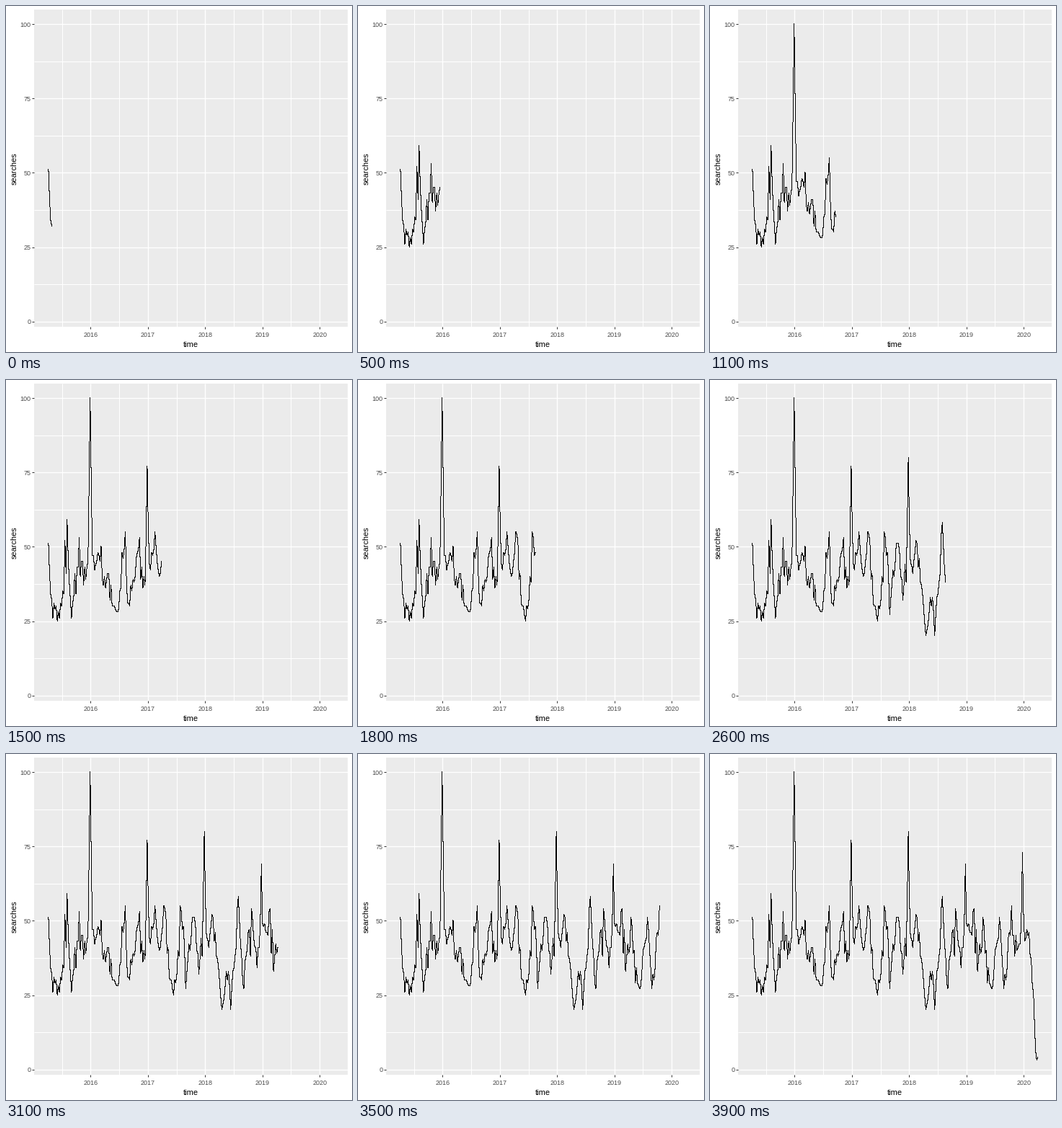
A matplotlib script that plays this animation: 480x480 px, repeating every 10 s.

```python
import numpy as np
import matplotlib.pyplot as plt
from matplotlib.animation import FuncAnimation
from matplotlib.patches import Rectangle

SIZE, DPI = 480, 100
PT = 72 / DPI                      # points per pixel
FRAMES, INTERVAL, REVEAL = 100, 100, 39
LEFT, RIGHT, TOP, BOTTOM = 39, 474, 5, 445
YEAR = 79.45                       # pixels per year
WEEKS = 260
STEPS = 150                        # samples per week, finer than a pixel

plt.rcParams["font.family"] = "Liberation Sans"


def year_x(year):
    return 117.35 + YEAR * (year - 2016)


def value_y(value):
    return 25.05 + 4.128 * (100 - value)


def search_values(week):
    """A repeating season with noise, a holiday spike and a final collapse."""
    season = {6: 31, 10: 26, 12: 29, 17: 54, 21: 27, 24: 37, 28: 50,
              34: 38, 37: 44, 42: 44, 45: 50, 50: 38}
    spring = [30, 41, 56, 20, 50]
    holiday = [100, 77, 80, 69, 73]
    knots = {0: 54}
    for n, level in enumerate(spring):
        knots[52 * n + 2] = level
        knots.update({52 * n + w: v for w, v in season.items()})
    knots = {w: v for w, v in knots.items() if w < 253}
    knots.update({253: 38, 256: 25, 258: 5, 259: 3, 260: 4})

    values = np.interp(week, list(knots), list(knots.values()))
    values *= 1 + np.random.default_rng(4).normal(0, 0.08, week.size)
    for n, peak in enumerate(holiday):
        spike = peak * (1 - np.abs(week - 52 * n - 38) / 3.5)
        values = np.maximum(values, spike)
    return np.round(values)


# Trace the series as single, unsmoothed pixels
week = np.arange(WEEKS + 1)
time = np.linspace(0, WEEKS, WEEKS * STEPS + 1)
xs = np.round(year_x(2016 + (7 * time - 271) / 365.25))
ys = np.round(value_y(np.interp(time, week, search_values(week))))
moved = np.r_[True, (np.diff(xs) != 0) | (np.diff(ys) != 0)]
time, xs, ys = time[moved], xs[moved], ys[moved]

fig = plt.figure(figsize=(SIZE / DPI, SIZE / DPI), dpi=DPI, facecolor="white")
ax = fig.add_axes([0, 0, 1, 1])
ax.set(xlim=(0, SIZE), ylim=(SIZE, 0))
ax.axis("off")
ax.add_patch(Rectangle((LEFT, TOP), RIGHT - LEFT, BOTTOM - TOP,
                       color="#EBEBEB", lw=0, zorder=0))


def stroke(x, y, color, width, zorder):
    ax.plot(x, y, color=color, lw=width * PT, zorder=zorder,
            solid_capstyle="butt")


def vertical(x, width):
    stroke([x, x], [TOP, BOTTOM], "white", width, 1)


def horizontal(y, width):
    stroke([LEFT, RIGHT], [y, y], "white", width, 1)


def label(x, y, text, size, color, **kwargs):
    ax.text(x, y, text, fontsize=size * PT, color=color, **kwargs)


for year in np.arange(2015.5, 2020):
    vertical(year_x(year), 1)
for value in np.arange(12.5, 100, 25):
    horizontal(value_y(value), 1)

for year in range(2016, 2021):
    x = year_x(year)
    vertical(x, 1.4)
    stroke([x, x], [BOTTOM, BOTTOM + 3], "#333333", 1, 2)
    label(x, 459, str(year), 9, "#4D4D4D", ha="center", va="baseline")
for value in range(0, 101, 25):
    y = value_y(value)
    horizontal(y, 1.4)
    stroke([LEFT - 3, LEFT], [y, y], "#333333", 1, 2)
    label(34.5, y + 3.6, str(value), 9, "#4D4D4D", ha="right", va="baseline")

label(256, 473, "time", 11, "black", ha="center", va="baseline")
label(12, 225.5, "searches", 11, "black", ha="center", va="center",
      rotation=90)

trace, = ax.plot([], [], ",", color="black", zorder=3)


def update(frame):
    last_week = week[np.round(week * REVEAL / WEEKS) <= frame][-1]
    shown = time <= last_week
    trace.set_data(xs[shown], ys[shown])
    return trace,


anim = FuncAnimation(fig, update, frames=FRAMES, interval=INTERVAL,
                     repeat=True, repeat_delay=0)
plt.show()
```
